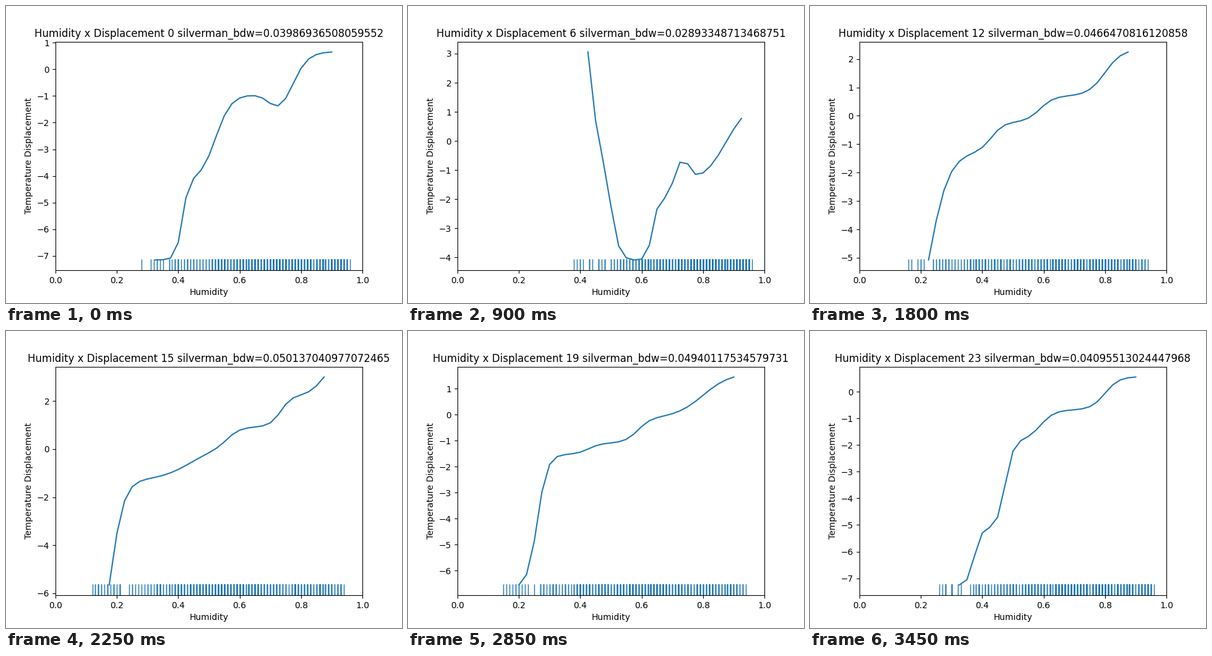
These frames come from a looping animation (640x480 px, 3.6 s). A matplotlib script:

```python
import math

import matplotlib.pyplot as plt
import numpy as np
from matplotlib.animation import FuncAnimation
from matplotlib.collections import LineCollection

HOURS = 24
STEP = 0.025
DAYS = 365
BLUE = "tab:blue"

fits = {}


def add_fit(hour, bdw, lowest, x_range, y_range, *steps):
    """A fit is a sum of soft steps (centre, width, rise), scaled to y_range."""
    fits[hour] = dict(bdw=bdw, lowest=lowest, x_range=np.array(x_range),
                      y_range=y_range, steps=steps)


add_fit(0, 0.03986936508059552, 28, (0.325, 0.9), (-7.15, 0.645),
        (0.413, 0.02, 2.95), (0.522, 0.05, 3.25), (0.7, 0.035, -0.95),
        (0.772, 0.05, 2.55))
add_fit(3, 0.03663429391554235, 31, (0.35, 0.9), (-4.9, 1.05),
        (0.409, 0.037, -6.35), (0.581, 0.042, 4.3), (0.69, 0.04, -1.0),
        (0.83, 0.08, 2.5))
add_fit(6, 0.02893348713468751, 38, (0.425, 0.925), (-4.085, 3.055),
        (0.436, 0.025, -5.0), (0.5, 0.027, -3.7), (0.635, 0.018, 2.1),
        (0.705, 0.02, 1.45), (0.757, 0.02, -0.9), (0.875, 0.078, 2.9))
add_fit(12, 0.0466470816120858, 16, (0.225, 0.875), (-5.075, 2.245),
        (0.226, 0.065, 7.5), (0.43, 0.04, 1.05), (0.588, 0.045, 0.92),
        (0.8, 0.055, 1.65))
add_fit(15, 0.050137040977072465, 12, (0.175, 0.875), (-5.655, 3.0),
        (0.18, 0.0435, 7.9), (0.44, 0.1, 1.45), (0.56, 0.04, 0.8),
        (0.734, 0.035, 1.3), (0.87, 0.045, 1.4))
add_fit(19, 0.04940117534579731, 15, (0.2, 0.9), (-6.55, 1.445),
        (0.26, 0.032, 5.18), (0.428, 0.04, 0.44), (0.588, 0.042, 0.97),
        (0.8, 0.09, 1.76))
add_fit(23, 0.04095513024447968, 26, (0.325, 0.9), (-7.25, 0.548),
        (0.374, 0.022, 2.15), (0.475, 0.026, 3.3), (0.59, 0.045, 1.15),
        (0.8, 0.045, 1.25))


def grid(x_range, n=None):
    start, stop = np.round(x_range / STEP) * STEP
    return np.linspace(start, stop, n or round((stop - start) / STEP) + 1)


def curve(fit, n):
    x = grid(fit["x_range"], n)
    y = sum(rise / 2 * np.tanh((x - c) / w) for c, w, rise in fit["steps"])
    return np.interp(y, (y.min(), y.max()), fit["y_range"])


def state(hour):
    """Bandwidth, lowest reading and curve, blended between known hours."""
    before = max(k for k in fits if k <= hour)
    after = min(k for k in fits if k >= hour)
    t = (hour - before) / max(after - before, 1)
    a, b = fits[before], fits[after]

    def mix(p, q):
        return p + (q - p) * t

    x = grid(mix(a["x_range"], b["x_range"]))
    y = mix(curve(a, len(x)), curve(b, len(x)))
    return mix(a["bdw"], b["bdw"]), round(mix(a["lowest"], b["lowest"])), x, y


def daily(hour, mean, swing, peak):
    return mean + swing * math.cos(2 * math.pi * (hour - peak) / 24)


def observations(hour, lowest):
    """Readings in whole percent: a sparse dry tail, then every value."""
    rng = np.random.default_rng(hour)
    h = np.arange(lowest, round(daily(hour, 95, 1.3, 3)) + 1)
    mode = daily(hour, 70, 17, 5)
    spread = (mode - lowest) / 2.4
    spread = np.where(h < mode, spread, 2 * spread)
    density = np.exp(-0.5 * ((h - mode) / spread) ** 2)
    counts = rng.poisson(DAYS * density / density.sum())
    tail = h < lowest + 12
    counts[tail] = rng.poisson(1.1, tail.sum())
    counts[~tail] = np.maximum(counts[~tail], 1)
    counts[[0, -1]] = 1
    return np.repeat(h, counts) / 100


fig, ax = plt.subplots(figsize=(6.4, 4.8), dpi=100)


def draw(hour):
    bdw, lowest, x, y = state(hour)
    ax.clear()
    ax.plot(x, y, color=BLUE, lw=1.5)
    # Repeated readings overlap, which makes their marks look heavier
    marks = [[(h, 0), (h, 0.05)] for h in observations(hour, lowest)]
    ax.add_collection(
        LineCollection(marks, colors=BLUE, linewidths=1,
                       transform=ax.get_xaxis_transform()),
        autolim=False)
    ax.set_xlim(0, 1)
    ax.set_xlabel("Humidity")
    ax.set_ylabel("Temperature Displacement")
    ax.set_title(f"Humidity x Displacement {hour} silverman_bdw={float(bdw)}")
    return []


anim = FuncAnimation(fig, draw, frames=HOURS, interval=1000 * 3.6 / HOURS,
                     init_func=lambda: [], repeat=True, repeat_delay=0)
plt.show()
```
